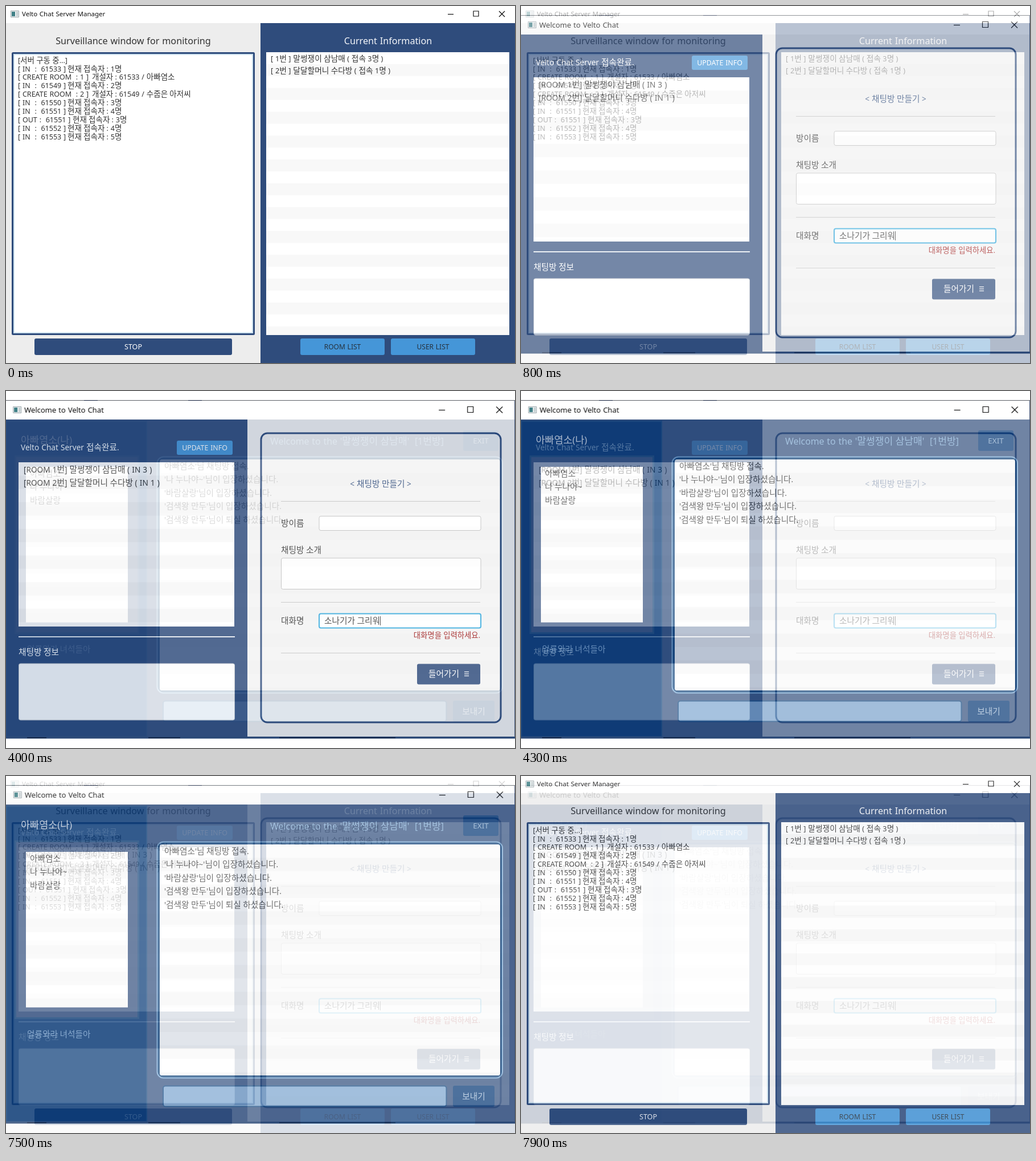
An HTML page with a canvas for the animation above (8 s loop, 894 by 626 pixels).

```html
<!DOCTYPE html>
<html lang="ko">
<head>
<meta charset="utf-8">
<title>Velto Chat</title>
<style>
html, body { margin: 0; width: 100%; height: 100%; overflow: hidden; background: #fff; }
canvas { display: block; }
</style>
</head>
<body>
<canvas id="stage" width="894" height="626"></canvas>
<script>
const W = 894, H = 626, LOOP = 8000;
const NAVY = '#2f4c7c', DEEP = '#003474', INK = '#333', STRIPE = '#f8f8f8';
const FONT = '"Noto Sans", "Noto Sans CJK KR", "Noto Sans CJK", sans-serif';
const HANGUL = /([\uac00-\ud7a3]+)/;
let g;

function rect(x, y, w, h, fill, r = 0, stroke, lw = 1) {
  g.beginPath();
  g.roundRect(x, y, w, h, r);
  if (fill) { g.fillStyle = fill; g.fill(); }
  if (stroke) { g.strokeStyle = stroke; g.lineWidth = lw; g.stroke(); }
}

function line(x1, y1, x2, y2, color, lw = 1) {
  g.beginPath();
  g.moveTo(x1, y1);
  g.lineTo(x2, y2);
  g.strokeStyle = color;
  g.lineWidth = lw;
  g.stroke();
}

// Hangul runs are set slightly larger than Latin runs; y is the middle of the line.
function text(str, x, y, size, color = INK, align = 0) {
  g.wordSpacing = '0.6px';
  const runs = str.split(HANGUL).filter(Boolean).map(s => {
    const font = `${HANGUL.test(s) ? size * 1.08 : size}px ${FONT}`;
    g.font = font;
    return { s, font, w: g.measureText(s).width };
  });
  x -= align * runs.reduce((sum, r) => sum + r.w, 0);
  g.fillStyle = color;
  for (const r of runs) {
    g.font = r.font;
    g.fillText(r.s, x, y + size * 0.37);
    x += r.w;
  }
}

function button(x, y, w, h, label, fill, color, size) {
  rect(x, y, w, h, fill, 3);
  text(label, x + w / 2, y + h / 2, size, color, 0.5);
}

function list(x, y, w, h, pitch) {
  rect(x, y, w, h, '#fff');
  for (let top = pitch; top < h; top += pitch * 2) {
    rect(x, y + top, w, Math.min(pitch, h - top), STRIPE);
  }
}

function titleBar(title, y, x, size, minX, boxX, closeX, s) {
  rect(x - 19.5, y - 5.5, 14, 11, '#eef2f3', 0, '#9aa5aa');
  rect(x - 18, y - 4, 6, 8, '#3f7f86');
  rect(x - 10, y - 4, 3, 8, '#c3cdd0');
  text(title, x, y, size, '#111');
  const c = '#111', a = y - s / 2, b = y + s / 2;
  line(minX, y + 0.5, minX + s, y + 0.5, c, 1.2);
  rect(boxX + 0.5, a, s - 1, s - 1, null, 0, c, 1.2);
  line(closeX, a, closeX + s, b, c, 1.2);
  line(closeX, b, closeX + s, a, c, 1.2);
}

function clientFrame(x) {
  line(0, 16.5, W, 16.5, '#5b6067');
  rect(137, 16, 24, 1, '#101c38');
  rect(320, 16, 24, 1, '#101c38');
  titleBar('Welcome to Velto Chat', 33, x, 13, x + 728, x + 778, x + 829, 11);
}

function clientEdge() {
  rect(0, 606, W, 3.5, '#2b4977');
  for (const [x, w] of [[37, 34], [250, 56], [480, 204]]) rect(x, 607, w, 2, '#14294d');
  rect(893, 17, 1, 590, '#44577a');
}

function server() {
  rect(0, 30, 447, 596, '#ededed');
  rect(447, 30, 447, 596, NAVY);
  titleBar('Velto Chat Server Manager', 14, 28, 11.5, 776, 820.5, 866, 10);

  text('Surveillance window for monitoring', 223.5, 61, 16.2, INK, 0.5);
  rect(11.5, 82.5, 424, 493, '#fff', 1, NAVY, 3);
  rect(14, 85, 419, 488, null, 0, '#c2dcec', 1.6);

  const log = [
    ['[서버 구동 중...]'],
    ['[ IN  :  61533 ]', 108, '현재 접속자 : 1명'],
    ['[ CREATE ROOM  : 1 ]', 151, '개설자 : 61533 / 아빠염소'],
    ['[ IN  :  61549 ]', 108, '현재 접속자 : 2명'],
    ['[ CREATE ROOM  : 2 ]', 151, '개설자 : 61549 / 수줍은 아저씨'],
    ['[ IN  :  61550 ]', 108, '현재 접속자 : 3명'],
    ['[ IN  :  61551 ]', 108, '현재 접속자 : 4명'],
    ['[ OUT :  61551 ]', 117, '현재 접속자 : 3명'],
    ['[ IN  :  61552 ]', 108, '현재 접속자 : 4명'],
    ['[ IN  :  61553 ]', 108, '현재 접속자 : 5명']
  ];
  log.forEach(([head, x, tail], i) => {
    const y = 95 + i * 14.9;
    text(head, 21, y, 12.5);
    if (tail) text(tail, x, y, 12.5);
  });
  button(50, 583, 347, 29, 'STOP', NAVY, '#fff', 12.5);

  text('Current Information', 671, 61, 16.2, '#f4f6fa', 0.5);
  list(457, 81, 427, 496, 20.9);
  text('[ 1번 ] 말썽쟁이 삼남매 ( 접속 3명 )', 465, 92, 12.7);
  text('[ 2번 ] 달달할머니 수다방 ( 접속 1명 )', 465, 113, 12.7);
  button(517, 583, 148, 29, 'ROOM LIST', '#4596d8', '#26323e', 12);
  button(676, 583, 148, 29, 'USER LIST', '#4596d8', '#26323e', 12);
}

function lobby() {
  rect(0, 50, 424, 557, NAVY);
  rect(424, 50, 470, 557, '#f3f3f3');
  clientFrame(32);
  clientEdge();

  text('Velto Chat Server 접속완료.', 26, 99, 13.6, '#fff');
  button(300, 87, 98, 25, 'UPDATE INFO', '#4596d8', '#fff', 12.4);
  list(22, 125, 379, 288, 23.35);
  text('[ROOM 1번] 말썽쟁이 삼남매 ( IN 3 )', 31, 138, 13.6);
  text('[ROOM 2번] 달달할머니 수다방 ( IN 1 )', 31, 161, 13.6);
  rect(22, 430, 380, 2, '#e4e9f0');
  text('채팅방 정보', 22, 457.5, 13.6, '#fff');
  rect(22.5, 478, 379, 99, '#fff', 3, '#c4c8ce');

  rect(448, 74, 421, 507, null, 11, NAVY, 3);
  text('< 채팅방 만들기 >', 658, 163, 13.6, NAVY, 0.5);
  for (const y of [193.5, 370.5, 459.5]) line(483, y, 833, y, '#c2c2c2');
  text('방이름', 483, 231.5, 13.6);
  rect(550, 219.5, 284, 25, '#fff', 3, '#bdbdbd');
  text('채팅방 소개', 483, 279, 13.6);
  rect(483.5, 293, 350.5, 54.5, '#fff', 3, '#bdbdbd');
  text('대화명', 483, 402.5, 13.6);
  rect(550, 390.5, 284, 25, '#fff', 3, '#2fa7dc', 2);
  text('소나기가 그리워', 559, 402.5, 13.6);
  line(657.5, 395, 657.5, 411, INK);
  text('대화명을 입력하세요.', 833, 428.5, 12.4, '#9c1414', 1);
  rect(722, 478.5, 111, 36, NAVY, 3);
  text('들어가기', 742, 496, 13.6, '#fff');
  for (const y of [492.5, 496, 499.5]) line(805, y, 813, y, '#fff', 1.2);
}

function room() {
  rect(0, 50, W, 557, '#304e7e');
  rect(0, 52, 248, 555, DEEP);
  rect(1, 53, 246, 553, null, 0, '#10437c', 2);
  clientFrame(33);
  clientEdge();

  text('아빠염소(나)', 26, 86.5, 16.2, '#e6edf5');
  rect(16.5, 114.5, 216, 310, '#2f4c7c', 0, '#13447a', 3);
  list(35, 133, 179, 272.5, 23.4);
  ['아빠염소', '나 누나야~', '바람살랑'].forEach((s, i) => text(s, 42, 145 + i * 23.4, 13.6));
  text('얼릉와라 녀석들아', 37, 453, 13.6, '#7fabd6');

  text("Welcome to the '말썽쟁이 삼남매'  [1번방]", 464, 88.5, 15.9, '#7fabd6');
  button(803, 69, 62, 36, 'EXIT', DEEP, '#86aace', 13.4);
  rect(265.5, 115.5, 606.5, 414, '#0a3f78', 11, '#79a9d6', 2);
  g.save();
  g.beginPath();
  g.roundRect(270, 120, 598, 405, 4);
  g.clip();
  list(270, 120, 598, 405, 23.5);
  g.restore();
  [
    "아빠염소'님 채팅방 접속.",
    "'나 누나야~'님이 입장하셨습니다.",
    "'바람살랑'님이 입장하셨습니다.",
    "'검색왕 만두'님이 입장하셨습니다.",
    "'검색왕 만두'님이 퇴실 하셨습니다."
  ].forEach((s, i) => text(s, 278, 131.5 + i * 23.5, 13.6));

  rect(276, 543.5, 497.5, 36, '#7ba5d0', 4, '#0d457f', 2);
  button(785, 543, 73, 37, '보내기', DEEP, '#a9c3de', 13.6);
}

function paint(draw) {
  const layer = document.createElement('canvas');
  layer.width = W;
  layer.height = H;
  g = layer.getContext('2d');
  rect(0, 0, W, H, '#fff');
  draw();
  return layer;
}

const [A, B, C] = [server, lobby, room].map(paint);
const out = document.getElementById('stage').getContext('2d');

function put(layer, alpha) {
  out.globalAlpha = alpha;
  out.drawImage(layer, 0, 0);
}

// Cross-fades advance in sixths, one step every 100 ms.
const fade = (t, start) => Math.max(0, Math.min(6, Math.floor((t - start) / 100) + 1)) / 6;

function frame(now) {
  const t = now % LOOP;
  const back = fade(t, 7500);
  put(A, 1);
  put(B, fade(t, 500));
  put(C, fade(t, 4000));
  put(B, back);
  put(A, back);
  requestAnimationFrame(frame);
}
requestAnimationFrame(frame);
</script>
</body>
</html>
```
